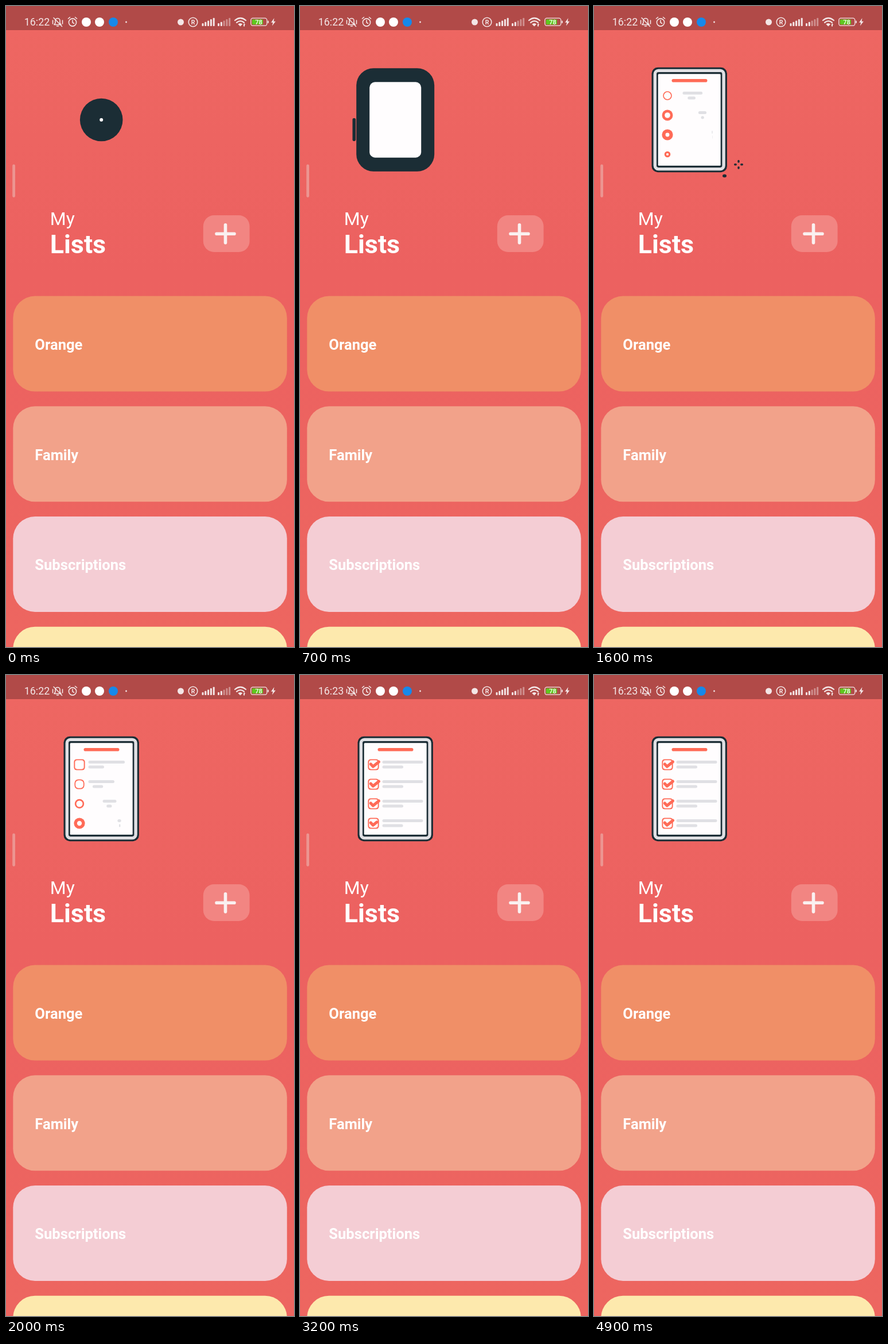
These frames come from a looping animation (502x1115 px, 5000 ms). An HTML page:

```html
<!DOCTYPE html>
<html lang="en">
<head>
<meta charset="utf-8">
<title>My Lists</title>
<style>
  html, body { margin: 0; width: 100%; height: 100%; overflow: hidden; background: #ed6460; }
  svg { display: block; width: 502px; height: 1115px; font-family: Roboto, sans-serif; }
</style>
</head>
<body>
<svg viewBox="0 0 502 1115" xmlns="http://www.w3.org/2000/svg">
  <defs>
    <linearGradient id="bg" x1="0" y1="0" x2="0" y2="1">
      <stop offset="0" stop-color="#ee6762"/>
      <stop offset=".42" stop-color="#ec6160"/>
      <stop offset="1" stop-color="#ed6660"/>
    </linearGradient>
  </defs>
  <rect width="502" height="1115" fill="url(#bg)"/>
  <rect width="502" height="42" fill="#b14a48"/>
  <g id="status" fill="#f3e6e6">
    <text id="clock" x="31.7" y="34" font-size="17.9">16:22</text>
    <g fill="none" stroke="#f3e6e6" stroke-width="1.6" stroke-linecap="round" stroke-linejoin="round">
      <path d="M84 32.500h12l-2-3v-4a4 4 0 0 0-8 0v4zM88.500 35h3M83 20.500l14.500 15M81.500 25v6M98.500 25v6"/>
      <circle cx="116" cy="28.5" r="6.6"/>
      <path d="M116 24.800v4l2.500 1.500M108.500 22l3-2.500M123.500 22l-3-2.500"/>
      <circle cx="326" cy="28" r="7.8"/>
      <path d="M399 25q9.500-8 19 0M402 28.800q6.500-5.400 13 0" stroke-width="2.2"/>
      <rect x="426.8" y="21.2" width="28" height="13" rx="3.5" stroke-width="1.3"/>
    </g>
    <circle cx="140" cy="28" r="8" fill="#fff"/>
    <circle cx="163" cy="28" r="8" fill="#fff"/>
    <circle cx="187" cy="28" r="8" fill="#1689ea"/>
    <circle cx="209.5" cy="28" r="1.4"/>
    <circle cx="304.5" cy="28" r="5.5"/>
    <text x="326" y="31.8" font-size="10.5" font-weight="700" text-anchor="middle">R</text>
    <path d="M404.300 31.500q4-3.200 8 0l-4 4zM415 30l2.500 2.500h-1.500v3h-2v-3z"/>
    <rect x="428.8" y="23.2" width="19" height="9" rx="1.5" fill="#5fc81f"/>
    <rect x="456" y="25.5" width="1.8" height="4.5" rx=".8"/>
    <text x="440.5" y="31.8" font-size="11" font-weight="500" text-anchor="middle" fill="#fff">78</text>
    <path d="M467.500 21l-5.500 7.800h3.200l-1.300 5.700 6-7.800h-3.400z"/>
  </g>
  <rect x="11.2" y="275.5" width="4.8" height="57.5" rx="2.4" fill="#ec9591"/>
  <g fill="#fff">
    <text x="76.7" y="380.7" font-size="32">My</text>
    <text x="76.7" y="430.2" font-size="44.8" font-weight="700">Lists</text>
  </g>
  <rect x="343.8" y="364" width="80.8" height="64" rx="19" fill="#f28582"/>
  <path d="M367 396.300h31M382.500 380.800v31" stroke="#faf0f0" stroke-width="5.6" stroke-linecap="round"/>
  <g id="cards"></g>
  <g id="art"></g>
</svg>
<script>
const NS = 'http://www.w3.org/2000/svg';
const LOOP = 5000, STEP = 100, CLOCK_TURN = 3200;
const DARK = '#1b2d35', RED = '#ff6b57', GREY = '#e0e0e4', WHITE = '#fffdfe';
const CX = 166.2, CY = 198, ROW_LAG = 267;
const $ = id => document.getElementById(id);
const art = $('art');

function set(el, attrs) {
  for (const k in attrs) el.setAttribute(k, attrs[k]);
  return el;
}
function add(parent, tag, attrs) {
  return parent.appendChild(set(document.createElementNS(NS, tag), attrs));
}
const shape = fill => add(art, 'rect', { fill });

// Timing helpers; k runs from 0 to 1
const mix = (a, b, k) => a + (b - a) * k;
const ramp = (t, from, to) => Math.min(1, Math.max(0, (t - from) / (to - from)));
const bump = (t, from, to) => Math.sin(Math.PI * ramp(t, from, to));
const easeOut = (k, power = 3) => 1 - (1 - k) ** power;
const easeBack = k => 1 + 2.7 * (k - 1) ** 3 + 1.7 * (k - 1) ** 2;
const smooth = k => k * k * (3 - 2 * k);
const easeInOut = k => k < .5 ? 4 * k ** 3 : 1 - 4 * (1 - k) ** 3;

function box(el, cx, cy, w, h, r) {
  set(el, { x: cx - w / 2, y: cy - h / 2, width: w, height: h, rx: r });
}
function bar(el, left, width, cy, h) {
  box(el, left + width / 2, cy, width, h, Math.min(width, h) / 2);
}

// Static parts
for (let i = 0; i < 5; i++) {
  const height = 5 + i * 2.3;
  for (const x of [341.5, 369]) {
    add($('status'), 'rect', {
      x: x + i * 4.8, y: 35 - height, width: 3, height, rx: 1,
      opacity: x > 360 && i > 1 ? .45 : 1
    });
  }
}
[['Orange', '#f08f67'], ['Family', '#f2a28a'], ['Subscriptions', '#f4cdd4'], ['', '#fde9ad']]
  .forEach(([name, fill], i) => {
    const y = 504.6 + i * 191.7;
    add($('cards'), 'rect', { x: 12.3, y, width: 477.5, height: 166, rx: 38.3, fill });
    add($('cards'), 'text', { x: 50.3, y: y + 93.2, 'font-size': 25.6, 'font-weight': 700, fill: '#fff' })
      .textContent = name;
  });

// Moving parts
const side = shape(DARK);
const body = shape(DARK);
const rim = add(art, 'rect', { x: 106.3, y: 112.4, width: 119.8, height: 171.2, rx: 6, fill: 'none', stroke: GREY });
const screen = shape(WHITE);
const heading = shape(RED);
const blob = add(art, 'ellipse', { cx: 227.5, cy: 295.5, fill: DARK });
const spark = add(art, 'path', { stroke: DARK, 'stroke-width': 3.4, 'stroke-linecap': 'round' });
const rows = [0, 1, 2, 3].map(i => {
  const y = 156 + i * 34;
  return {
    y,
    ring: shape(RED), hole: shape(WHITE), long: shape(GREY), short: shape(GREY),
    check: add(art, 'path', {
      d: `M123.3 ${y - 1}l4 4.2 10.2-8.2`, pathLength: 1, fill: 'none', stroke: RED,
      'stroke-width': 5, 'stroke-linecap': 'round', 'stroke-linejoin': 'round'
    })
  };
});

// A dot swells into a tablet while its screen opens inside
function drawTablet(t) {
  const k = ramp(t, 0, 1000);
  const w = mix(74.6, 131.4, easeBack(k));
  const h = mix(74.6, 182.4, easeOut(k));
  box(body, CX, CY, w, h, w / 2 * mix(1, .16, easeOut(ramp(t, 300, 1000), 1.3)));

  const open = easeInOut(ramp(t, 20, 1080));
  const sw = mix(6, 109, open);
  box(screen, CX, CY, sw, mix(6, 159.6, open), mix(sw / 2, 1.5, open));

  set(rim, { 'stroke-width': 5.4 * ramp(t, 750, 1050) });
  bar(side, 91.5, 5.6, 215, 40 * bump(t, 500, 900));
  const title = 62 * ramp(t, 850, 1250);
  bar(heading, 166.5 - title / 2, title, 129.8, 5.6);
}

function drawSparks(t) {
  const size = bump(t, 1300, 1900);
  set(blob, { rx: 3.5 * size, ry: 2.8 * size });
  const near = 9.6 * ramp(t, 1300, 1900), far = near + 1.5 * size;
  const rays = [[0, -1], [1, 0], [0, 1], [-1, 0]].map(([x, y]) =>
    `M${252 + x * near} ${275.8 + y * near}L${252 + x * far} ${275.8 + y * far}`);
  set(spark, { d: size > .01 ? rays.join('') : '' });
}

// A line slides in from the right edge while growing to its full length
function drawLine(el, s, y, length, travel, growth) {
  const left = mix(212, 143.5, ramp(s, 0, travel) ** 1.2);
  bar(el, left, length * smooth(ramp(s, 0, growth)), y, 5);
}

function drawRow(row, t) {
  const s = t - 700;
  const half = 9.6 * easeOut(ramp(s, 0, 360), 2.5) - 1.8 * bump(s, 620, 1130);
  const hole = Math.min(half, mix(1.6, 7.7, ramp(s, 0, 1200)));
  const round = mix(1, .5, ramp(s, 900, 1200));
  box(row.ring, 128, row.y, half * 2, half * 2, half * round);
  box(row.hole, 128, row.y, hole * 2, hole * 2, hole * round);
  drawLine(row.long, t - 960, row.y - 4.5, 71, 740, 1300);
  drawLine(row.short, t - 960, row.y + 4, 36.5, 850, 1540);
  const drawn = ramp(t, 2170, 2470);
  set(row.check, { 'stroke-dasharray': `${drawn} 2`, visibility: drawn > 0 ? 'visible' : 'hidden' });
}

function draw(t) {
  $('clock').textContent = t < CLOCK_TURN ? '16:22' : '16:23';
  drawTablet(t);
  drawSparks(t);
  rows.forEach((row, i) => drawRow(row, t - i * ROW_LAG));
}

const start = performance.now();
function tick() {
  const t = (performance.now() - start) % LOOP;
  draw(Math.floor((t + 4) / STEP) * STEP % LOOP);
  requestAnimationFrame(tick);
}
tick();
</script>
</body>
</html>
```
